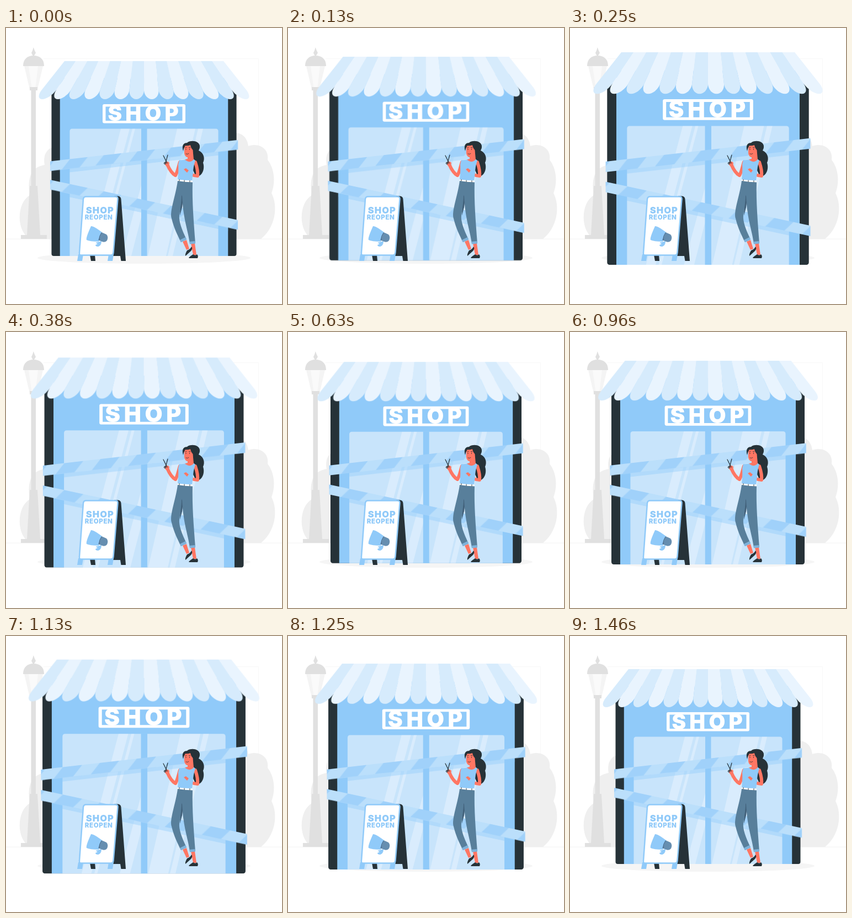
These frames come from a looping animation (500 by 500 pixels, 1500 ms). An HTML page without scripts:

```html
<!DOCTYPE html>
<html lang="en">
<head>
<meta charset="utf-8">
<title>Shop reopening</title>
<style>
  html, body { margin: 0; width: 100%; height: 100%; overflow: hidden; background: #fff; }
  svg { display: block; width: 100vw; height: 100vh; }
  text { font-family: Inter, "Liberation Sans", sans-serif; font-weight: 900; }
  .blue { fill: #90caf9; }
  .dark { fill: #263238; }
  .skin { fill: #ff7663; }
  .grey { fill: #e0e0e0; }
  .bush { fill: #efefef; }
  .arm { fill: none; stroke: #ff7663; stroke-width: 6; stroke-linecap: round; stroke-linejoin: round; }
  .awning { --odd: #d6ebfc; --even: #e9f4fe; }
  .swap { --odd: #e9f4fe; --even: #d6ebfc; }
  #half use { fill: var(--odd); }
  #half use:nth-child(even) { fill: var(--even); }
  .shop { transform-origin: 250px 236.5px; animation: beat 1.5s linear infinite; }
  @keyframes beat {
    0% { transform: scale(1); }
    8.67% { transform: scale(1.0445); }
    18% { transform: scale(1.098); }
    25.33% { transform: scale(1.0775); }
    42% { transform: scale(1.033); }
    54% { transform: scale(1.001); }
    64% { transform: scale(1.0445); }
    75% { transform: scale(1.1); }
    83.33% { transform: scale(1.0565); }
    97.2%, 100% { transform: scale(1); }
  }
</style>
</head>
<body>
<svg viewBox="0 0 500 500">
  <defs>
    <pattern id="bands" x="14" width="61" height="17.5" patternUnits="userSpaceOnUse">
      <path d="M22 0H54L39 17.5H7Z" fill="#a0d1fa"/>
    </pattern>
    <g id="tape">
      <path class="blue" opacity=".4" d="M18 17h304v7H18z"/>
      <path fill="#bbdffb" d="M0 0h340v17.5H0z"/>
      <path fill="url(#bands)" d="M0 0h340v17.5H0z"/>
    </g>
    <path id="stripe" d="M-10.3 0H10.3L13.3 53A13.3 16 0 0 1 -13.3 53Z"/>
    <g id="half">
      <use href="#stripe" transform="translate(116.3 60) skewX(-36.3)"/>
      <use href="#stripe" transform="translate(136.9 60) skewX(-31.9)"/>
      <use href="#stripe" transform="translate(157.4 60) skewX(-27)"/>
      <use href="#stripe" transform="translate(178 60) skewX(-21.6)"/>
      <use href="#stripe" transform="translate(198.6 60) skewX(-15.8)"/>
      <use href="#stripe" transform="translate(219.1 60) skewX(-9.6)"/>
      <use href="#stripe" transform="translate(239.7 60) skewX(-3.2)"/>
    </g>
  </defs>

  <!-- street -->
  <path fill="none" stroke="#f8f8f8" d="M68 55.5H457.5V382"/>
  <path stroke="#ececec" stroke-width=".7" d="M0 382.3H500"/>
  <path class="bush" d="M44 382C19 370 18 318 43 303C38 270 46 252 70 248C67 230 73 217 92 214V382Z"/>
  <path class="bush" d="M405 382V190C426 187 437 197 439 214C460 207 477 220 474 239C486 254 489 279 481 299C494 325 487 362 462 382Z"/>
  <g class="grey">
    <path d="M49.7 35L52 41L54 45L51 50H48.5L46 45L48 41Z"/>
    <path d="M31 69C31 56 39 50 50 50S69 56 69 69Z"/>
    <path fill="#f4f4f4" d="M33 69H67L57 111H43Z"/>
    <path fill="#fafafa" d="M41 69H58L53 111H47Z"/>
    <path d="M43 107H57V113H54V286H57L62 375H74V382H27V375H38L43 286H45.5V113H43Z"/>
  </g>
  <ellipse cx="250" cy="416.5" rx="193" ry="10.5" fill="#f5f5f5"/>

  <g class="shop">
    <rect class="dark" x="82.5" y="112" width="335" height="301" rx="4"/>
    <path class="blue" d="M97.8 90H402.2V413H97.8Z"/>
    <path fill="#c8e4fb" d="M115.500 413V187q0-4.500 4.500-4.500H380q4.500 0 4.500 4.500V413Z"/>
    <path fill="#fff" opacity=".3" d="M208 182.500h16L163 413h-16zM229 182.500h5L173 413h-5zM245 285v58L227 413h-17zM310 182.500h33L290 413h-33zM348 182.500h9L302 413h-9z"/>
    <path class="blue" d="M245 182h10.500V413H245z"/>

    <rect x="175" y="138" width="150" height="34.500" rx="3" fill="#fff"/>
    <path class="blue" d="M180.500 142.500h139v25.500h-139z"/>
    <text x="184.500" y="168.500" font-size="38.500" letter-spacing="6.200" fill="#fff">SHOP</text>

    <g class="awning">
      <use href="#half"/>
      <use href="#half" class="swap" transform="translate(500) scale(-1 1)"/>
    </g>

    <use href="#tape" transform="translate(80 241.500) skewY(-6.500)"/>
    <use href="#tape" transform="translate(80 275) skewY(12.100)"/>
  </g>

  <!-- pavement sign -->
  <path class="dark" d="M196 304.500H203Q208 305 208.500 310L217 422H208.500L207 413H190ZM152 411h9l1 11h-8z"/>
  <path class="blue" d="M131 410h9l-2 12h-9zM186 410h9l-2 12h-9z"/>
  <path fill="#fff" stroke="#90caf9" stroke-width="2.500" d="M145 305.500H198Q203 305.500 202.500 310L194.500 407Q194 411.500 190 411.500H136Q132.500 411.500 133 407L140 310Q140.500 305.500 145 305.500Z"/>
  <g class="blue">
    <text x="144.800" y="336" font-size="16.500" letter-spacing="1">SHOP</text>
    <text x="142.800" y="347" font-size="11.500" letter-spacing=".6">REOPEN</text>
    <path d="M154 359Q158 358 174 370L168 387Q152 387 146 384Q144 381 154 359Z"/>
    <path d="M162 389L173 386Q173 394 167 396Q162 396 162 393L166 391Z"/>
  </g>
  <path fill="#668eb0" d="M173 370L182 374Q186 378 183 385Q180 389 174 387L167 384Z"/>
  <path fill="none" stroke="#47698a" d="M173 371Q168 377 169 385"/>

  <!-- woman -->
  <path class="dark" d="M337 208C349 204 354 214 349 222C358 226 361 236 357 244C361 256 355 270 344 269L333 245Z"/>
  <path class="skin" d="M323 214Q331 207 338 214L339 227Q335 235 328 234Q322 232 323 222Z"/>
  <path class="dark" d="M321 223C318 214 321 208 328 208C333 203 350 203 351 214C351 220 347 224 341 223Q335 219 334 212Q329 214 325 213Q322 217 321 223Z"/>
  <path fill="none" stroke="#263238" stroke-width=".8" stroke-linecap="round" d="M326 219v1.500M332.500 219v1.500M325 217l2-.7M331.500 216.500l2.500.3M326 228q3 1.500 5-.5"/>
  <path class="arm" d="M315 243C312 252 311 260 307 267C301 264 296 256 292 247"/>
  <path class="arm" d="M343 243C346 252 348 260 347 268C339 268 331 263 326 258"/>
  <path class="blue" d="M314 239Q321 240 328 237Q332 241 338 236L343 240Q339 252 339 262L337 276L311 275Q313 256 312 247Z"/>
  <path class="skin" d="M329 230L339 227L340 238Q334 246 324 238.500L329 237Z"/>
  <path class="skin" d="M288 243q4-3 8 1l-1 6q-6 1-7-3zM322 256l4-2 5 4-3 4z"/>
  <path fill="none" stroke="#263238" stroke-width="1.200" stroke-linecap="round" d="M285 231L290 241L293 230M290 241L288 245M290 241L292 245"/>
  <circle cx="288" cy="245" r="1.700" fill="none" stroke="#263238"/>

  <path class="skin" d="M320 387L327 384L332 400L327 402ZM335 390L342 390L345 411L339 411Z"/>
  <path class="dark" d="M325 413Q324 410 328 403Q334 401 336 396Q339 399 335 404ZM331 416Q334 413 339 410Q343 413 346 410Q349 413 347 417H332Z"/>
  <path fill="#405f78" d="M316 300H322L319 325L315 340Z"/>
  <path fill="#587f9b" d="M311 277C307 306 296 332 300 345C304 362 311 376 317 388L327 383C318 364 313 350 314 340C316 325 318 315 318 305L329 278Z"/>
  <path fill="#587f9b" d="M318 278L338 279C337 315 340 350 343 390L333 391C330 367 321 347 319 305Z"/>
  <path fill="#7eb2da" d="M315 384L325 379L327 383L317 388ZM332.500 387L342.500 386L343 390.500L333 391.500Z"/>
  <path fill="none" stroke="#fff" stroke-width="2.800" d="M311 275.500Q324 278 338 278"/>
  <path stroke="#263238" stroke-width=".9" d="M314 274v3.500M323 275.500v3.500M333 276v3.500"/>
</svg>
</body>
</html>
```
